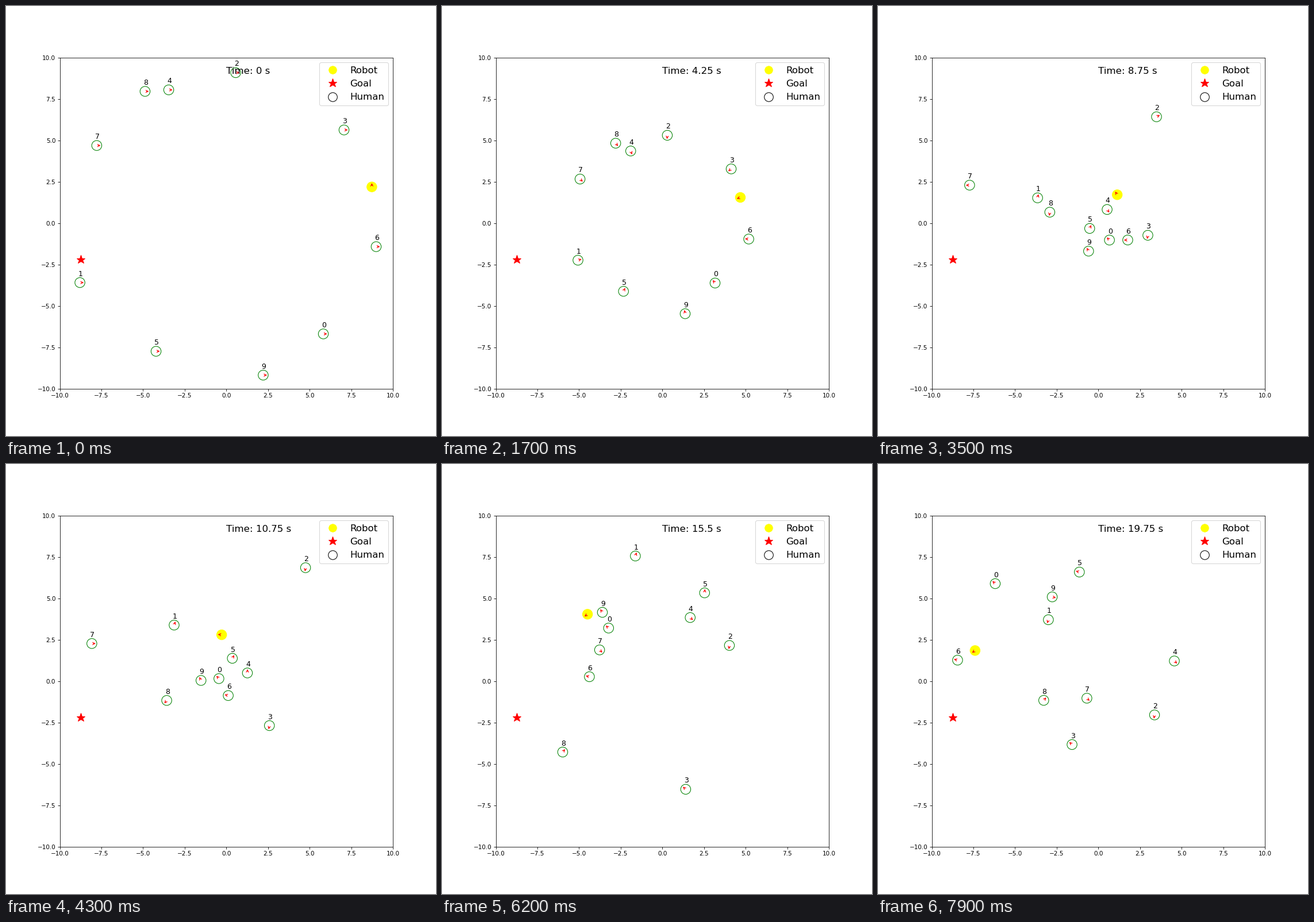
Animation, 748 px wide and 748 px high, one loop 8000 ms. Source, as a matplotlib script:

```python
import numpy as np
import matplotlib.pyplot as plt
from matplotlib.animation import FuncAnimation
from matplotlib.lines import Line2D
from matplotlib.patches import ArrowStyle, Circle, FancyArrowPatch

FRAMES, DT, RADIUS = 80, 0.25, 0.3
BEATS = (20, 40, 60, 79)  # new goals are picked every 5 s
SOLO = 9                  # steps walked freely before anyone is in the way
HEAD = ArrowStyle("->", head_length=4, head_width=2)


class Agent:
    """Heads for the middle at unit speed, then for one point per beat.

    Extra turns are (step, x, y).
    """

    def __init__(self, start, *points, turns=(), angle=0.0):
        start = np.array(start)
        stops = {0: start,
                 SOLO: start * (1 - SOLO * DT / np.hypot(*start))}
        stops.update(zip(BEATS, points))
        stops.update((step, xy) for step, *xy in turns)
        steps = sorted(stops)
        x, y = np.transpose([stops[s] for s in steps])
        n = np.arange(FRAMES)
        self.path = np.column_stack([np.interp(n, steps, x),
                                     np.interp(n, steps, y)])
        dx, dy = np.diff(self.path, axis=0).T
        self.angles = np.append(angle, np.arctan2(dy, dx))

    def attach(self, ax, name="", **style):
        self.body = ax.add_patch(Circle(self.path[0], RADIUS, **style))
        self.arrow = ax.add_patch(
            FancyArrowPatch((0, 0), (1, 0), color="red", arrowstyle=HEAD))
        self.label = ax.text(0, 0, name, fontsize=12)

    def show(self, n):
        pos, a = self.path[n], self.angles[n]
        self.body.center = pos
        self.arrow.set_positions(
            pos, pos + RADIUS * np.array([np.cos(a), np.sin(a)]))
        self.label.set_position(pos + (-0.1, 0.4))


robot = Agent((8.73, 2.19), (4.0, 1.3), (0.45, 2.73), (-4.15, 4.3), (-7.4, 1.85),
              turns=[(SOLO, 6.49, 2.23), (29, 1.95, 0.5), (51, -2.24, 2.99)],
              angle=np.pi / 2)

h0 = Agent((5.82, -6.69), (2.72, -3.1), (-0.02, -0.33), (-2.88, 2.89), (-6.19, 5.89))
h1 = Agent((-8.79, -3.59), (-4.45, -2.05), (-3.38, 2.72), (-1.75, 7.17), (-3.0, 3.71),
           turns=[(62, -1.62, 7.56)])
h2 = Agent((0.56, 9.09), (0.25, 4.73), (4.57, 6.99), (4.1, 2.65), (3.37, -2.04),
           turns=[(42, 4.79, 7.1)])
h3 = Agent((7.06, 5.63), (3.69, 2.92), (2.73, -1.95), (1.75, -6.85), (-1.58, -3.83))
h4 = Agent((-3.46, 8.05), (-1.65, 3.75), (1.25, -0.15), (1.33, 4.15), (4.56, 1.22))
h5 = Agent((-4.22, -7.74), (-2.03, -3.5), (-0.02, 0.74), (2.5, 5.0), (-1.14, 6.59),
           turns=[(63, 2.55, 5.5)])
h6 = Agent((8.99, -1.42), (4.59, -0.92), (0.82, -1.05), (-3.9, 0.15), (-8.45, 1.27))
h7 = Agent((-7.78, 4.69), (-4.6, 2.34), (-8.77, 2.28), (-4.13, 2.23), (-0.69, -1.03))
h8 = Agent((-4.88, 7.96), (-2.36, 4.3), (-3.1, -0.55), (-6.3, -4.65), (-3.28, -1.16),
           turns=[(SOLO, -3.98, 6.24)])
h9 = Agent((2.21, -9.18), (1.25, -4.9), (-1.2, -0.62), (-3.35, 3.8), (-2.77, 5.09),
           turns=[(70, -4.6, 5.58)])
humans = [h0, h1, h2, h3, h4, h5, h6, h7, h8, h9]

fig, ax = plt.subplots(figsize=(10, 10), dpi=74.8)
ax.set(xlim=(-10, 10), ylim=(-10, 10))


def dot(face, edge):
    return Line2D([], [], ls="None", marker="o", ms=15, mfc=face, mec=edge)


goal, = ax.plot(-8.73, -2.19, "*", color="red", ms=15)
ax.legend([dot("yellow", "white"), goal, dot("none", "black")],
          ["Robot", "Goal", "Human"], fontsize=16, loc="upper right")

robot.attach(ax, color="yellow")
for i, human in enumerate(humans):
    human.attach(ax, str(i), fill=False, edgecolor="green")
clock = ax.text(0, 9.02, "", fontsize=16)


def update(n):
    for agent in [robot, *humans]:
        agent.show(n)
    clock.set_text(f"Time: {n * DT if n else 0} s")


anim = FuncAnimation(fig, update, frames=FRAMES, interval=100,
                     repeat=True, repeat_delay=0)
plt.show()
```
